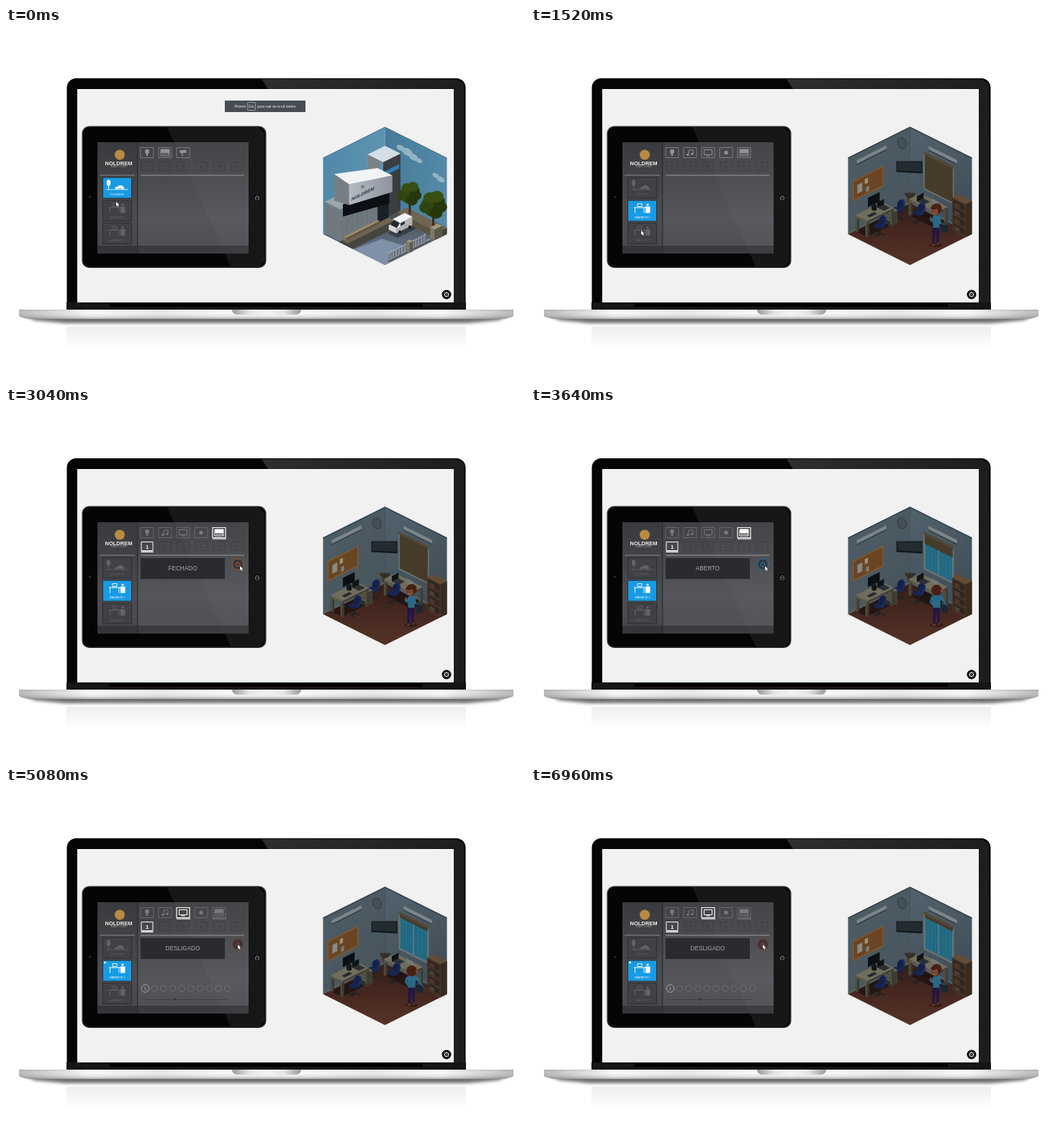
An HTML page with a canvas that plays this animation: 721x490 px, repeating every 7000 ms.

```html
<!DOCTYPE html>
<html lang="pt">
<head>
<meta charset="utf-8">
<style>
html, body { margin: 0; width: 100%; height: 100%; overflow: hidden; background: #fff; }
canvas { display: block; }
</style>
</head>
<body>
<canvas id="stage" width="721" height="490"></canvas>
<script>
const g = document.getElementById('stage').getContext('2d');
const LOOP = 7000, BRAND = 'NOLDREM';
const clamp = x => Math.max(0, Math.min(1, x));
const ramp = (t, a, b) => clamp((t - a) / (b - a));
const smooth = x => x * x * (3 - 2 * x);

// ---------- flat drawing ----------
function grad(x0, y0, x1, y1, ...colors) {
  const r = g.createLinearGradient(x0, y0, x1, y1);
  colors.forEach((c, i) => r.addColorStop(i / (colors.length - 1), c));
  return r;
}
function rect(x, y, w, h, fill, r = 0) {
  g.fillStyle = fill;
  g.beginPath();
  g.roundRect(x, y, w, h, r);
  g.fill();
}
function frame(x, y, w, h, color, lw = 1, r = 0) {
  g.strokeStyle = color;
  g.lineWidth = lw;
  g.beginPath();
  g.roundRect(x, y, w, h, r);
  g.stroke();
}
function trace(pts) {
  g.beginPath();
  pts.forEach(p => g.lineTo(p[0], p[1]));
}
function poly(fill, ...pts) {
  trace(pts);
  g.closePath();
  g.fillStyle = fill;
  g.fill();
}
function line(color, lw, ...pts) {
  trace(pts);
  g.strokeStyle = color;
  g.lineWidth = lw;
  g.stroke();
}
function oval(x, y, rx, ry, fill, rot = 0) {
  g.fillStyle = fill;
  g.beginPath();
  g.ellipse(x, y, rx, ry, rot, 0, 7);
  g.fill();
}
function ring(x, y, r, color, lw = 1, a = 0, b = 7) {
  g.strokeStyle = color;
  g.lineWidth = lw;
  g.beginPath();
  g.arc(x, y, r, a, b);
  g.stroke();
}
function text(s, x, y, size, color, align = 'center', style = '') {
  g.font = `${style} ${size}px "Liberation Sans", Arial, sans-serif`;
  g.textAlign = align;
  g.fillStyle = color;
  g.fillText(s, x, y);
}

// ---------- rotating cube: u runs along the left wall, v along the right ----------
let yaw = 0;
const WALL = 106;
function at(u, v, h = 0) {
  const x = (v - u) * 86, d = (u + v - 1) * 86, c = Math.cos(yaw), s = Math.sin(yaw);
  return [526.5 + x * c + d * s, 287 + (d * c - x * s) / 2 - h];
}
const face = (fill, ...pts) => poly(fill, ...pts.map(p => at(...p)));
const seam = (color, lw, ...pts) => line(color, lw, ...pts.map(p => at(...p)));
const onLeft = (u0, h0, u1, h1, fill, v = 0) => face(fill, [u0, v, h0], [u1, v, h0], [u1, v, h1], [u0, v, h1]);
const onRight = (v0, h0, v1, h1, fill, u = 0) => face(fill, [u, v0, h0], [u, v1, h0], [u, v1, h1], [u, v0, h1]);
const onFloor = (u0, v0, u1, v1, fill, h = 0) => face(fill, [u0, v0, h], [u1, v0, h], [u1, v1, h], [u0, v1, h]);
function box(u0, v0, h0, u1, v1, h1, color, left = .2, right = .42) {
  onRight(v0, h0, v1, h1, color, u1);
  onRight(v0, h0, v1, h1, `rgba(0,0,0,${left})`, u1);
  onLeft(u0, h0, u1, h1, color, v1);
  onLeft(u0, h0, u1, h1, `rgba(0,0,0,${right})`, v1);
  onFloor(u0, v0, u1, v1, color, h1);
}

function exterior() {
  onLeft(0, 0, 1, WALL, grad(441, 0, 527, 0, '#5089a9', '#5f93b0'));
  onRight(0, 0, 1, WALL, grad(527, 0, 612, 0, '#467b9a', '#548aa8'));
  onFloor(0, 0, 1, 1, grad(0, 255, 0, 330, '#45494f', '#70819b'));
  line('#3c7193', 1, at(1, 0, WALL), at(0, 0, WALL), at(0, 1, WALL));
  for (const [v, h, r] of [[.25, 88, 6], [.36, 87, 8], [.46, 84, 7], [.55, 83, 5], [.82, 74, 5], [.9, 72, 6]]) {
    const [x, y] = at(0, v, h);
    oval(x, y, r, r * .6, '#94b3c3', .5);
  }
  // driveway and kerb
  onFloor(.2, .25, 1, .48, '#45443f');
  onFloor(.2, .25, .95, .35, '#6f6450');
  face('#7f90a9', [.6, .55], [1, .5], [1, 1], [.5, 1]);

  // tower
  box(0, 0, 0, .28, .25, 80, '#d3dfe5', .42, .72);
  onRight(.21, 5, .25, 78, '#4b9bc8', .28);
  onLeft(.02, 60, .25, 66, '#2d7fb0', .25);

  // lower block with slats
  box(.2, 0, 0, .97, .25, 44, '#9ba5ad', .25, .25);
  for (let h = 3; h < 42; h += 3) seam('#5d6870', .6, [.97, 0, h], [.97, .25, h], [.2, .25, h]);
  for (let u = .3; u < .95; u += .08) seam('#616b73', .5, [u, .25, 0], [u, .25, 28]);
  onLeft(.2, 0, .38, 24, '#192026', .26);
  box(.38, .26, 0, .92, .29, 4, '#a3916b');
  face('#0c1014', [.95, .27, 51], [.2, .27, 40], [.2, .27, 20], [.95, .27, 34]);

  // upper white volume
  face('#777f86', [.9, .08, 83], [.9, .32, 79], [.9, .32, 50], [.9, .08, 46]);
  face(grad(476, 0, 537, 0, '#b6bbc2', '#8d949c'), [.9, .32, 50], [.2, .32, 38], [.2, .32, 61], [.9, .32, 79]);
  face('#f1f3f4', [.9, .08, 83], [.9, .32, 79], [.2, .32, 61], [.2, .08, 61]);
  const o = at(.86, .32, 54), e = at(.86 - 1 / 86, .32, 54), dot = at(.68, .32, 66);
  oval(...dot, 2.5, 2.5, '#777f8c');
  g.save();
  g.transform(e[0] - o[0], e[1] - o[1], 0, 1, ...o);
  text(BRAND, 0, 0, 6.2, '#202b3d', 'left', 'italic bold');
  g.restore();

  // planter and trees
  box(0, .35, 0, .15, 1, 9, '#6e6652', .2, .35);
  for (const [v, h, r] of [[.47, 37, 17], [.85, 38, 20]]) {
    const [x, y] = at(.07, v, h), foot = at(.07, v, 8);
    line('#3c2b1b', 3, foot, [x, y]);
    for (let i = 0; i < 12; i++) {
      const a = i * 2.4, d = r * .62 * Math.sqrt(i / 11);
      oval(x + Math.cos(a) * d, y + Math.sin(a) * d, r * .46, r * .4, ['#2f440f', '#374f12', '#26370b'][i % 3]);
    }
  }
  box(.08, .93, 0, .2, 1, 15, '#a0967f');

  // van
  const wheel = (u, v) => oval(...at(u, v, 2), 1.8, 2.4, '#15171a');
  onFloor(.15, .5, .46, .66, 'rgba(0,0,0,.35)');
  box(.16, .48, 2, .42, .6, 8, '#e8eaec', .08, .25);
  box(.16, .48, 8, .35, .6, 14, '#f4f5f6', .1, .25);
  face('#20282e', [.35, .49, 13], [.35, .59, 13], [.4, .59, 8], [.4, .49, 8]);
  onLeft(.28, 9, .35, 13, '#2b343b', .6);
  wheel(.37, .61);
  wheel(.21, .61);

  // front fence
  box(.25, .96, 0, .93, .99, 3, '#8f979f');
  for (let u = .9; u > .28; u -= .045) if (Math.abs(u - .57) > .04) box(u, .96, 3, u + .022, .98, 12, '#aeb9c5');
  box(.55, .95, 0, .6, 1, 14, '#a0988a');
}

function chair(u, v) {
  const [x, y] = at(u, v);
  line('#20232c', 1.5, [x - 7, y], [x, y - 4], [x + 7, y - 1]);
  line('#20232c', 1.5, [x - 3, y + 2], [x, y - 4], [x, y - 13]);
  oval(x, y - 14, 8, 4, '#1d2b5e');
  oval(x + 4, y - 21, 5.5, 7.5, '#22346f', .25);
  oval(x + 3, y - 21, 4, 6, '#192757', .25);
}
function desk(u0, v0, u1, v1) {
  onFloor(u0, v0, u1, v1, 'rgba(0,0,0,.45)');
  for (const [u, v] of [[u0, v1 - .03], [u1 - .03, v0], [u1 - .03, v1 - .03]]) box(u, v, 0, u + .03, v + .03, 20, '#7a745f');
  box(u0, v0, 19, u1, v1, 22, '#8a866f');
}
function laptop(u, v) {
  face('#343a3e', [u, v, 23], [u + .1, v, 23], [u + .1, v + .1, 23], [u, v + .1, 23]);
  onLeft(u, 23, u + .11, 31, '#111619', v);
}

function office(blind) {
  onLeft(0, 0, 1, WALL, grad(441, 180, 527, 250, '#5f717b', '#58676f'));
  onRight(0, 0, 1, WALL, grad(527, 150, 612, 280, '#647783', '#4a5963'));
  onFloor(0, 0, 1, 1, grad(0, 245, 0, 330, '#40231c', '#6b3d2d'));
  line('#394851', 1.5, at(1, 0, WALL), at(0, 0, WALL), at(0, 1, WALL));
  seam('#4a5962', .8, [0, 0, 0], [0, 0, WALL]);
  seam('#74797a', 1.3, [1, 0, 2], [0, 0, 2], [0, 1, 2]);

  // lamps, vent, board
  onLeft(.38, 90, .86, 92, '#3f4e56');
  onLeft(.38, 92, .86, 97, '#98a2a4');
  onRight(.3, 86, .76, 88, '#3f4e56');
  onRight(.3, 88, .76, 93, '#98a2a4');
  oval(...at(.13, 0, 89), 7 * Math.cos(yaw + .3), 8.5, '#44535b', -.3);
  oval(...at(.13, 0, 89), 5 * Math.cos(yaw + .3), 6.8, '#52626b', -.3);
  onLeft(.43, 42, .93, 71, '#9c6a38');
  onLeft(.45, 44, .91, 69, '#835428');
  onLeft(.77, 50, .85, 62, '#a9aaa3');
  onLeft(.68, 58, .73, 65, '#c2b58f');
  onLeft(.66, 46, .71, 53, '#939b9b');

  // window and blind
  onRight(.22, 29, .71, 81, '#818a8b');
  onRight(.25, 32, .68, 78, '#27809f');
  for (let v = .29; v < .66; v += .06) seam('#3c8fb0', .7, [0, v, 32], [0, v, 78]);
  seam('#8c979a', 1.4, [0, .46, 32], [0, .46, 78]);
  seam('#4a7d91', .8, [0, .25, 54], [0, .68, 54]);
  const low = 31 + 43 * blind;
  onRight(.24, low, .69, 80, '#5c4c34');
  for (let h = 78; h > low; h -= 3) seam('#453a29', .8, [0, .24, h], [0, .69, h]);
  onRight(.22, 78, .71, 82, '#655944');

  // screen across the corner
  face('#151b1f', [.22, 0, 68], [0, .2, 67], [0, .2, 50], [.22, 0, 53]);
  face('#29343a', [.205, 0, 66.5], [0, .185, 65], [0, .185, 52], [.205, 0, 54.5]);

  // plant, shelf, desks
  const [px, py] = at(.08, .08, 14);
  rect(px - 4, py - 2, 8, 8, '#6b3421', 2);
  for (let i = -2; i < 3; i++) oval(px + i * 2.2, py - 4, 1.4, 4, i % 2 ? '#4e3827' : '#3a3328', i * .35);
  box(0, .78, 0, .1, 1, 46, '#7a5c40', .3, .45);
  for (let i = 0; i < 4; i++) onRight(.8, 3 + i * 11, .98, 11 + i * 11, '#3c2c21', .1);
  for (let i = 0; i < 4; i++) onRight(.82, 3 + i * 11, .9, 8 + i * 11, ['#594f43', '#62412e'][i % 2], .1);
  desk(.01, .18, .2, .62);
  laptop(.08, .3);
  onRight(.43, 23, .54, 29, '#8e9291', .08);
  chair(.36, .17);
  box(.42, .06, 0, .53, .22, 18, '#85816d');
  for (let h = 5; h < 18; h += 5) seam('#45443c', .7, [.53, .06, h], [.53, .22, h], [.42, .22, h]);
  desk(.46, .01, .89, .2);
  onLeft(.55, 29, .74, 42, '#0d1215', .06);
  box(.63, .05, 22, .67, .09, 29, '#1b2023');
  laptop(.5, .08);
  onFloor(.7, .12, .82, .17, '#2c3134', 23);
  chair(.77, .28);
  chair(.25, .39);
  const [bx, by] = at(.2, .76);
  poly('#202e3c', [bx - 5, by - 13], [bx + 5, by - 13], [bx + 4, by], [bx - 4, by]);
  oval(bx, by - 13, 5, 2, '#36495a');
}

// dim evening light over the whole room
function dim() {
  face('rgba(8,12,16,.2)', [1, 0, WALL], [0, 0, WALL], [0, 1, WALL], [0, 1], [1, 1], [1, 0]);
}

function person(t) {
  const back = t > 3500 && t < 5800, y = 1 + Math.sin(t / 350) * .5;
  const skin = '#a46244', hair = '#592517', shirt = '#347fa4';
  const x = back ? 563.5 : 562.5;
  oval(x, 302, 9, 3, 'rgba(0,0,0,.35)');
  poly('#2b1a50', [x - 5, 276], [x + 5, 276], [x + 4, 301], [x + 1, 301], [x, 283], [x - 2, 302], [x - 5, 302]);
  rect(x - 6, 300, 5, 3.5, '#73392b', 1.5);
  rect(x + 1, 299, 4, 3, '#73392b', 1.5);
  if (back) {
    poly(shirt, [x - 6, 260 + y], [x + 6, 260 + y], [x + 5, 278], [x - 5, 278]);
    line(shirt, 3.3, [x - 6, 262 + y], [x - 8, 270], [x - 4, 275]);
    line(shirt, 3.3, [x + 6, 262 + y], [x + 9, 268], [x + 5, 264]);
    oval(x, 253 + y, 7.3, 7.5, hair);
    oval(x + 7, 254 + y, 1.5, 2, skin);
    return;
  }
  poly(shirt, [x - 4, 261 + y], [x + 5, 260 + y], [x + 5, 278], [x - 4, 278]);
  line(shirt, 3.3, [x + 4, 262 + y], [x + 6, 271], [x + 2, 274]);
  oval(x + 1, 251 + y, 7.2, 7.4, hair);
  oval(x - 1.5, 255 + y, 4.6, 5, skin);
  oval(x - 2, 249 + y, 5.5, 3, hair, -.3);
  oval(x - 4, 255 + y, .7, 1, '#241510');
  oval(x, 255 + y, .7, 1, '#241510');
  line(shirt, 3.2, [x - 3, 263 + y], [x - 5, 268 + y], [x - 8, 266 + y]);
  oval(x - 8, 264 + y, 2, 2.3, skin);
  rect(x - 11, 260 + y, 3, 5, '#15191d', .5);
}

function scene(t) {
  if (t < 480) {
    yaw = -Math.PI / 4 * ramp(t, 240, 480);
    exterior();
  } else {
    yaw = Math.PI / 4 * (1 - ramp(t, 480, 920));
    office(smooth(ramp(t, 3240, 3800)));
    if (t > 940) person(t);
    dim();
  }
}

// ---------- laptop and tablet ----------
function computer() {
  rect(84, 416, 555, 30, grad(0, 416, 0, 446, '#eeeeee', '#fff'));
  rect(84.5, 70, 554, 330, '#050505', [13, 13, 0, 0]);
  poly(grad(355, 0, 638, 0, '#2e2e2f', '#1d1d1e'), [355, 71], [625, 71], [636, 77], [637, 392], [622, 392], [622, 85], [364, 85]);
  rect(84, 382, 555, 11, '#151515');
  rect(143, 384, 436, 4, '#000');
  rect(99, 85, 523, 297, '#fff');
  rect(99, 86, 522, 294, '#f1f1f1');
  rect(99, 380.5, 523, 1, '#c5ddcb');

  // silver base over its soft shadow
  g.filter = 'blur(2px)';
  poly('#707070', [24, 400], [699, 400], [684, 407], [640, 411], [82, 411], [40, 407]);
  g.filter = 'none';
  const base = new Path2D('M18 392H705V401Q700 404 688 405H36Q22 404 18 401Z');
  g.fillStyle = grad(0, 392, 0, 405, '#e6e6e6', '#fafafa', '#f4f4f4', '#e2e2e2', '#b4b4b4');
  g.fill(base);
  g.fillStyle = grad(18, 0, 705, 0, 'rgba(0,0,0,.25)', 'rgba(0,0,0,0)', 'rgba(0,0,0,.06)', 'rgba(0,0,0,0)', 'rgba(0,0,0,0)', 'rgba(0,0,0,.06)', 'rgba(0,0,0,0)', 'rgba(0,0,0,.25)');
  g.fill(base);
  rect(314, 392, 96, 7, grad(314, 0, 410, 0, '#999', '#e5e5e5', '#f4f4f4', '#e5e5e5', '#999'), [0, 0, 7, 7]);

  // settings button
  oval(612, 371, 6.5, 6.5, '#080808');
  ring(612, 371, 2.7, '#ddd', 1);
  for (let i = 0; i < 8; i++) {
    const a = i * Math.PI / 4, c = Math.cos(a), s = Math.sin(a);
    line('#ddd', 1, [612 + c * 3, 371 + s * 3], [612 + c * 4, 371 + s * 4]);
  }
  oval(612, 371, .8, .8, '#ddd');
}

function toast(t) {
  g.globalAlpha = 1 - ramp(t, 120, 400);
  rect(304, 101, 112, 16, '#484d53');
  text('Premir', 317.5, 110.7, 5.4, '#eee', 'left');
  frame(335.5, 103.5, 11, 11, '#bbb', .7, 1);
  text('Esc', 341, 110.7, 4.8, '#eee');
  text('para sair do ecrã inteiro', 349, 110.7, 5.1, '#eee', 'left');
  g.globalAlpha = 1;
}

const glyph = {
  bulb(x, y, c) {
    oval(x, y - 1.5, 3, 3.2, c);
    rect(x - 1.2, y + 1.5, 2.4, 3, c);
  },
  music(x, y, c) {
    line(c, 1, [x - 2, y + 3], [x - 2, y - 3], [x + 4, y - 4], [x + 4, y + 2]);
    oval(x - 3.2, y + 3, 1.8, 1.4, c);
    oval(x + 2.8, y + 2, 1.8, 1.4, c);
  },
  tv(x, y, c) {
    frame(x - 5.5, y - 4, 11, 7, c, 1);
    rect(x - 2.5, y + 4, 5, 1, c);
  },
  link(x, y, c) { oval(x, y, 2.7, 2.7, c); },
  blind(x, y, c) {
    frame(x - 6, y - 4.5, 12, 9, c, 1);
    rect(x - 6, y - 4.5, 12, 5, c);
    for (let i = -4; i < 5; i += 2) rect(x + i, y + 1, 1, 2, c);
  },
  camera(x, y, c) {
    poly(c, [x - 5, y - 3], [x + 4, y - 4], [x + 5, y], [x - 4, y + 1]);
    line(c, 1.3, [x - 1, y], [x - 1, y + 5]);
  },
  wave(x, y, c) {
    ring(x, y + 2, 4, c, 1, -2.3, -.8);
    oval(x, y + 2, 1, 1, c);
  }
};

function tab(y, label, outdoor, on) {
  const c = on ? '#fff' : '#626368';
  rect(134, y, 41, 30, '#2d2e31');
  rect(135, y + 1, 39, 28, on ? '#189be4' : '#404146');
  if (outdoor) {
    oval(142.5, y + 8, 2.7, 4.2, c);
    rect(142, y + 11, 1, 6, c);
    rect(139, y + 17, 31, .8, c);
    poly(c, [151, y + 16], [152, y + 14], [155, y + 13.5], [157, y + 11.5], [161, y + 11.5], [163, y + 13.5], [165, y + 16]);
    oval(154, y + 16, 1.4, 1.4, c);
    oval(162, y + 16, 1.4, 1.4, c);
  } else {
    rect(143, y + 10, 16, 1, c);
    line(c, .9, [144.5, y + 10], [144.5, y + 18]);
    line(c, .9, [157, y + 10], [157, y + 18]);
    frame(148, y + 5, 6, 4, c, .9);
    rect(159, y + 9, 6.5, 9, c);
    oval(162, y + 6.5, 1.6, 1.6, c);
  }
  text(label, 154.5, y + 25.5, 3.7, c);
}

function tablet(t) {
  rect(105.5, 136.5, 256, 197.5, '#2c2d2e', 10);
  rect(107, 138, 253, 194.5, '#050505', 9);
  poly('#171718', [224, 138], [350, 138], [359, 146], [359, 325], [352, 332], [312, 332]);
  oval(116.5, 235, 1.5, 1.5, '#2b2e32');
  oval(349, 236, 6, 6, '#080808');
  ring(349, 236, 5.6, '#2c2d2f', .8);
  line('#898b8d', .9, [345.5, 236], [349, 233], [352.5, 236]);
  frame(346.5, 236, 5, 3, '#898b8d', .8);

  // screen surface
  rect(127, 159, 210, 155, grad(0, 159, 0, 314, '#404144', '#4a4b4f', '#55565b', '#4e4f53'));
  rect(127, 159, 56, 155, 'rgba(0,0,0,.1)');
  poly('rgba(255,255,255,.025)', [234, 159], [337, 159], [337, 314], [304, 314]);
  rect(127, 303, 210, 11, 'rgba(20,20,24,.35)');
  rect(182, 160, 1.3, 154, '#2b2c2e');
  rect(130, 204.5, 49, 1, '#8a8b8d');
  rect(187, 204.5, 144, 1, '#9a9b9d');

  oval(158, 176.5, 7, 7, '#b98a43');
  text(BRAND, 156.5, 190.5, 7.5, '#eee', 'center', 'bold');
  text('SMART LIVING', 156.5, 194, 3.2, '#999');

  const indoor = t >= 760, sel = t < 2240 ? -1 : t < 4440 ? 4 : 2;
  const icons = indoor ? ['bulb', 'music', 'tv', 'link', 'blind', 'wave'] : ['bulb', 'blind', 'camera'];
  icons.forEach((name, i) => {
    const x = 196 + i * 25, on = i === sel;
    const c = on ? '#fff' : name === 'wave' ? '#47484c' : sel < 0 ? '#929395' : '#77787b';
    frame(x - 9, 166.5, 18, 14, c, on ? 1.2 : .7);
    glyph[name](x, 173.5, c);
    if (on || (i === 4 && sel === 2)) rect(x - 9, 181.5, 19, 1.2, c);
  });
  const one = t >= 2640;
  for (let i = 0; i < 6; i++) {
    const x = 196 + i * 25, on = one && !i, c = on ? '#fff' : '#3b3c40';
    frame(x - 8, 186.5, 16, 12, c, on ? 1 : .7);
    text(i + 1, x, 195.5, 7.5, c, 'center', on ? 'bold' : '');
    if (on) rect(x - 8.5, 199.5, 17, 1.5, c);
  }

  tab(207.5, 'EXTERIOR', true, !indoor);
  tab(239.5, 'GABINETE 1', false, indoor);
  tab(271, 'GABINETE 2', false, false);

  if (one) {
    const [label, c] = t < 3200 ? ['FECHADO', '#b5602d'] : t < 4700 ? ['ABERTO', '#2189c6'] : ['DESLIGADO', '#9c3e35'];
    rect(187, 209, 117, 29, '#2a2b2e');
    text(label, 245.5, 226.3, 8.2, '#a9aaac');
    oval(322, 217.5, 8, 8, '#35363a');
    ring(322, 217.5, 7.6, c, .9);
    ring(322, 217.8, 2.8, c, 1, -1, 4.14);
    line(c, 1, [322, 213.5], [322, 217]);
  }
  if (t >= 4700) {
    for (let i = 0; i < 10; i++) {
      const x = 193.5 + i * 12.7;
      ring(x, 279, i ? 4.3 : 5.3, i ? '#77787c' : '#bbb', .8);
      text(i + 1, x, 281, 4.5, i ? '#55565a' : '#ddd');
    }
    rect(190, 294, 118, .8, '#3b3c40');
    oval(235, 294.3, 1.8, 1.8, '#35363a');
    oval(137.5, 243, 1.4, 1.4, '#fff');
  }
}

// time, x, y
const path = [[0, 153, 242], [350, 154, 256], [1200, 154, 256], [1460, 153, 282], [1640, 153, 282], [2120, 295, 172],
  [2300, 295, 172], [2520, 196, 191], [2680, 196, 191], [3000, 325, 220], [3700, 325, 220], [4200, 247, 175],
  [4420, 247, 175], [4590, 196, 191], [4720, 196, 191], [5000, 322, 218], [LOOP, 322, 218]];
function cursor(t) {
  const i = path.findIndex(k => k[0] > t), a = path[i - 1], b = path[i], f = smooth(ramp(t, a[0], b[0]));
  const x = a[1] + (b[1] - a[1]) * f, y = a[2] + (b[2] - a[2]) * f;
  const arrow = [[0, 0], [0, 6], [1.4, 4.8], [2.5, 7], [3.6, 6.4], [2.6, 4.4], [4.4, 4.3], [0, 0]].map(p => [x + p[0], y + p[1]]);
  line('#222', 1, ...arrow);
  poly('#fff', ...arrow);
}

function draw(now) {
  const t = now % LOOP;
  g.clearRect(0, 0, 721, 490);
  computer();
  scene(t);
  toast(t);
  tablet(t);
  cursor(t);
}
const start = performance.now();
function tick() {
  draw(performance.now() - start);
  requestAnimationFrame(tick);
}
tick();
</script>
</body>
</html>
```
